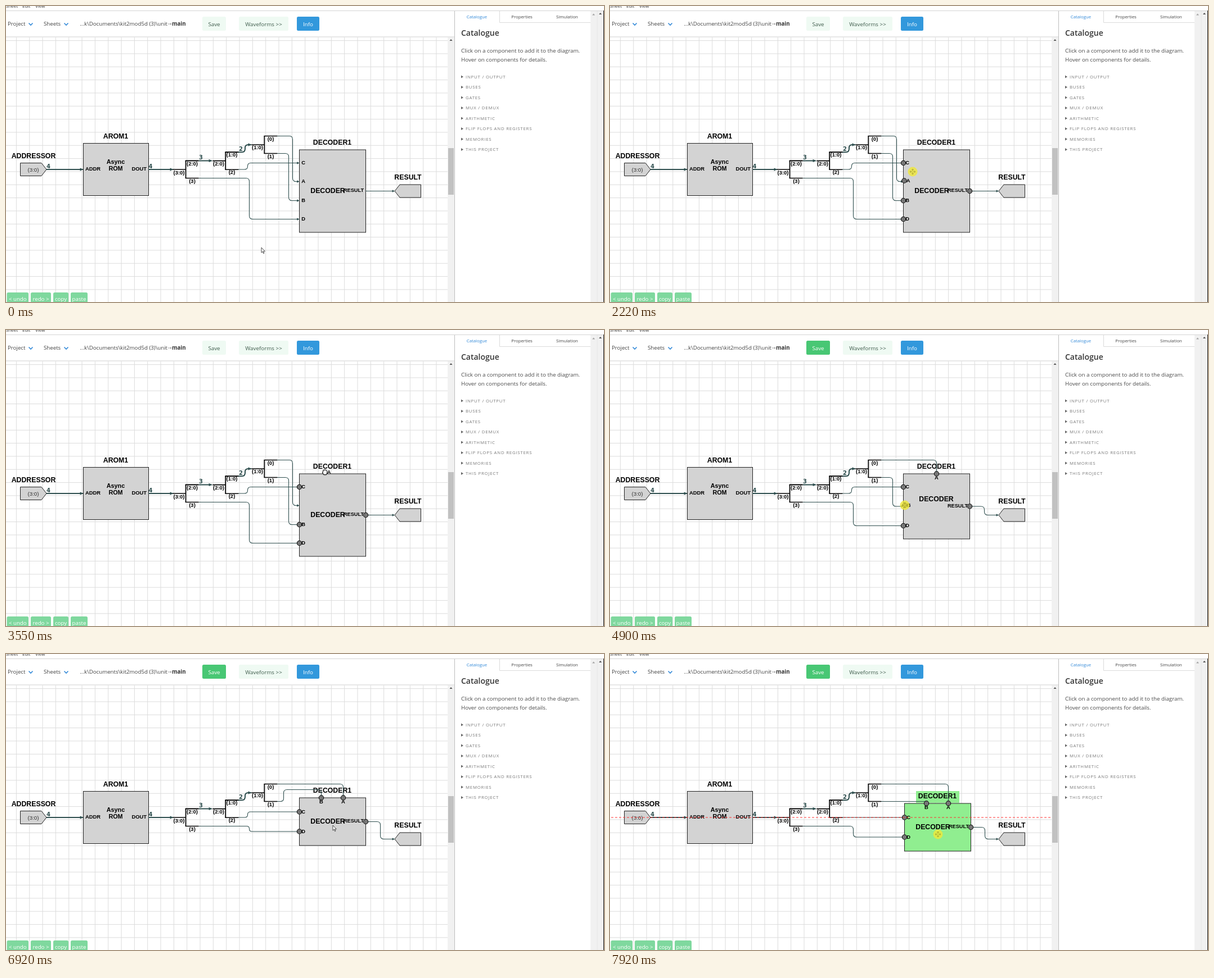
Animation of 1063 by 527 pixels, one loop 7.99 s. Source, as an HTML page:

```html
<!DOCTYPE html>
<html lang="en">
<head>
<meta charset="utf-8">
<title>Circuit editor</title>
<style>
html, body { margin: 0; width: 100%; height: 100%; overflow: hidden; background: #fff; }
svg { display: block; width: 100%; height: 100%; }
text { white-space: pre; }
.ui { font-family: "Open Sans", "Noto Sans", sans-serif; }
.sym { font-family: "Liberation Sans", Arial, sans-serif; }
.num { font-family: "DejaVu Sans", sans-serif; }
</style>
</head>
<body>
<svg id="stage" viewBox="0 0 1063 527"></svg>
<script>
const LOOP = 7990;
const SLATE = '#2f4f4f';

// ---------- drawing helpers ----------
const rect = (x, y, w, h, fill, extra = '') =>
  `<rect x="${x}" y="${y}" width="${w}" height="${h}" fill="${fill}" ${extra}/>`;
const path = (d, stroke, width = 1, extra = '') =>
  `<path d="${d}" fill="none" stroke="${stroke}" stroke-width="${width}" ${extra}/>`;
const shape = (d, fill, stroke = 'none', width = 1) =>
  `<path d="${d}" fill="${fill}" stroke="${stroke}" stroke-width="${width}" stroke-linejoin="round"/>`;

// y is the middle of the capital letters
function text(cls, x, y, str, size, fill = '#000', anchor = 'start', weight = 400, extra = '') {
  const safe = str.replace(/</g, '&lt;').replace(/>/g, '&gt;');
  return `<text class="${cls}" x="${x}" y="${y + size * 0.36}" font-size="${size}" fill="${fill}" ` +
    `text-anchor="${anchor}" font-weight="${weight}" ${extra}>${safe}</text>`;
}
const ui = (...a) => text('ui', ...a);
const bold = (x, y, str, size = 9.4, anchor = 'middle') =>
  text('sym', x, y - 0.4, str, size, '#000', anchor, 700);

// polyline with rounded corners
function rounded(pts, r = 6) {
  let d = `M${pts[0]}`;
  for (let i = 1; i < pts.length - 1; i++) {
    const [a, b, c] = [pts[i - 1], pts[i], pts[i + 1]];
    const la = Math.hypot(a[0] - b[0], a[1] - b[1]) || 1;
    const lc = Math.hypot(c[0] - b[0], c[1] - b[1]) || 1;
    const k = Math.min(r, la / 2, lc / 2);
    const toward = (p, l) => [b[0] + (p[0] - b[0]) * k / l, b[1] + (p[1] - b[1]) * k / l];
    d += `L${toward(a, la)}Q${b} ${toward(c, lc)}`;
  }
  return d + `L${pts[pts.length - 1]}`;
}
function arrow([x, y], down, s = 2.2) {
  return shape(down ? `M${x},${y}l${-s},${-2 * s}h${2 * s}z` : `M${x},${y}l${-2 * s},${-s}v${2 * s}z`, SLATE);
}
function wire(pts, width = 1.1, down = false) {
  return path(rounded(pts), SLATE, width) + arrow(pts[pts.length - 1], down, width > 1.5 ? 2.7 : 2.2);
}
const port = ([x, y]) =>
  `<circle cx="${x}" cy="${y}" r="4.2" fill="#777" stroke="#111" stroke-width="1.1"/>`;

// ---------- fixed parts ----------
function grid() {
  let d = '';
  for (let x = 18.4; x < 785; x += 23.33) d += `M${x.toFixed(2)},56V527`;
  for (let y = 61.6; y < 527; y += 23.33) d += `M0,${y.toFixed(2)}H785`;
  return path(d, '#dcdcdc');
}

function button(x, y, w, h, label, fill, color) {
  return rect(x, y, w, h, fill, 'rx="2.5"') + ui(x + w / 2, 32, label, 9.8, color, 'middle');
}

function toolbar() {
  const chevron = x => path(`M${x - 3.5},30.5l3.5,3.5l3.5,-3.5`, '#3289d8', 1.6);
  return rect(0, 0, 1063, 8, '#fff') +
    ui(0, 0.5, 'Sheet', 8, '#333') + ui(29, 0.5, 'Edit', 8, '#333') + ui(52, 0.5, 'View', 8, '#333') +
    path('M0,8.5H1063', '#d5d5d5') + path('M0,55H797', '#cfcfcf') +
    ui(3, 32, 'Project', 9.7, '#444') + chevron(44) +
    ui(67, 32, 'Sheets', 9.7, '#444') + chevron(107) +
    ui(287, 32, '...k\\Documents\\kit2mod5d (3)\\unit', 9.7, '#444', 'end') +
    path('M288,32h6m-2,-1.5l2,1.5l-2,1.5', '#888', 0.8) +
    ui(295, 32, 'main', 9.7, '#333', 'start', 700) +
    button(414, 19, 88, 25, 'Waveforms >>', '#effaf3', '#3f5c4c') +
    button(517, 19, 40, 25, 'Info', '#3298dc', '#fff');
}

function editButtons() {
  const items = [[1.5, 38.5, '< undo'], [44, 36, 'redo >'], [84, 27, 'copy'], [115, 30, 'paste']];
  return items.map(([x, w, label]) =>
    rect(x, 510, w, 22, '#7fd89e', 'rx="2.5"') +
    ui(x + w / 2, 522, label, 9.7, '#fff', 'middle')).join('');
}

function sidePanel() {
  const groups = ['INPUT / OUTPUT', 'BUSES', 'GATES', 'MUX / DEMUX', 'ARITHMETIC',
    'FLIP FLOPS AND REGISTERS', 'MEMORIES', 'THIS PROJECT'];
  const up = (x, y, c) => shape(`M${x - 2.5},${y + 1.5}h5l-2.5,-3z`, c);
  return rect(785, 56, 12, 471, '#f1f1f1') + rect(786, 253, 10, 83, '#c1c1c1') + up(791, 60.5, '#505050') +
    rect(797, 9, 242, 518, '#fff') + path('M797.5,9V527', '#bdbdbd') +
    rect(1039, 9, 24, 518, '#f1f1f1') + path('M1051,9V527', '#e6e6e6') +
    up(1044.5, 15, '#a3a3a3') + up(1056.5, 13.5, '#505050') + path('M1062.5,8V527', '#111') +
    path('M877.5,9V29.5H1039', '#dbdbdb') +
    ui(837, 19, 'Catalogue', 7.8, '#3289d8', 'middle') +
    ui(917, 19, 'Properties', 7.8, '#444', 'middle') +
    ui(997.5, 19, 'Simulation', 7.8, '#444', 'middle') +
    ui(809, 48.4, 'Catalogue', 14, '#363636', 'start', 600) +
    ui(809, 79.5, 'Click on a component to add it to the diagram.', 9.8, '#4a4a4a') +
    ui(809, 95, 'Hover on components for details.', 9.8, '#4a4a4a') +
    groups.map((g, i) => {
      const y = 126 + 18.5 * i;
      return shape(`M809,${y - 2.5}v5l4,-2.5z`, '#666') +
        ui(817, y, g, 7.8, '#7a7a7a', 'start', 400, 'letter-spacing=".78"');
    }).join('');
}

function splitter(x, y, thickTop) {
  return path(`M${x - 23},${y}H${x}M${x},${y - 15.5}V${y + 15.5}`, '#000', 1.7) +
    path(`M${x - 0.8},${y - 15.5}h24`, '#000', thickTop ? 2 : 1.5) +
    path(`M${x - 0.8},${y + 15.5}h24`, '#000', 1.5);
}

function circuit() {
  const box = '#d3d3d3';
  const labels = [['(3:0)', 307.5, 296.5], ['(2:0)', 331, 280.5], ['(3)', 331, 311.5],
    ['(2:0)', 378, 280.5], ['(1:0)', 401.5, 265], ['(2)', 401.5, 296],
    ['(1:0)', 447, 251.5], ['(0)', 470.5, 237], ['(1)', 470.5, 268]];
  const widths = [['4', 75.5, 285], ['4', 257, 285], ['3', 346.5, 269], ['2', 417.5, 254]];
  return shape('M25.5,279.5H63L72,291L63,302.5H25.5Z', box, '#222') +
    shape('M737.5,318H700L691,329.5L700,341H737.5Z', box, '#222') +
    rect(137.5, 244.5, 116, 93, box, 'stroke="#222"') +
    bold(49, 266.5, 'ADDRESSOR', 12.3) + bold(195, 231.5, 'AROM1', 12.3) + bold(714.5, 304.5, 'RESULT', 12.3) +
    text('sym', 48.5, 291.5, '(3:0)', 9.8, '#333', 'middle') +
    bold(195, 277.5, 'Async', 10.8) + bold(195, 290, 'ROM', 10.8) +
    bold(141, 290, 'ADDR', 9.4, 'start') + bold(250, 290, 'DOUT', 9.4, 'end') +
    splitter(319.5, 291, true) + splitter(390.2, 275.7, true) + splitter(459.3, 247, false) +
    wire([[72, 291], [137, 291]], 2) + wire([[253, 291], [297, 291]], 2) +
    wire([[343, 275.5], [366, 275.5]], 2) +
    wire([[413, 260.2], [425, 260.2], [425, 247], [436, 247]], 2) +
    labels.map(([s, x, y]) => bold(x, y, s, 9.5)).join('') +
    widths.map(([s, x, y]) => text('num', x, y, s, 10, SLATE, 'middle', 700)).join('');
}

// ---------- timing ----------
// bursts of movement: first step, last step, number of steps
const bursts = [[530, 1290, 12], [1360, 2150, 10], [2220, 2900, 11], [3070, 3210, 3], [3460, 3620, 3],
  [3820, 4370, 9], [4900, 5650, 12], [5730, 5730, 1], [5990, 6080, 2],
  [6470, 7230, 12], [7300, 7440, 3], [7640, 7920, 4]];

function hold(t) {
  let q = 0;
  for (const [a, b, n] of bursts) {
    if (t < a) break;
    const step = n > 1 ? (b - a) / (n - 1) : 1;
    q = Math.min(b, a + Math.floor((t - a) / step + 1e-6) * step);
  }
  return q;
}

// pointer positions: time, x, y
const track = [[460, 454, 430], [530, 461, 416], [850, 488, 335], [1000, 499, 308], [1290, 521, 311],
  [2150, 523, 311], [2220, 538, 295], [2480, 557, 268], [2760, 566, 255], [2900, 567, 254],
  [3070, 568, 253], [3210, 567, 253], [3750, 567, 253], [3960, 552, 290], [4140, 533, 327],
  [4240, 526, 324], [4370, 524, 312], [4900, 524, 312], [5170, 538, 282], [5450, 547, 261],
  [5650, 546, 259], [5730, 545, 259], [6400, 545, 259], [6600, 562, 280], [6850, 581, 305],
  [6950, 581, 305], [7150, 583, 315], [7230, 583, 315], [7300, 583, 320], [7440, 583, 321],
  [7920, 583, 321]];

function pointer(t) {
  if (t <= track[0][0]) return track[0].slice(1);
  for (let i = 1; i < track.length; i++) {
    const [t0, x0, y0] = track[i - 1], [t1, x1, y1] = track[i];
    if (t <= t1) {
      const k = (t - t0) / (t1 - t0);
      return [x0 + (x1 - x0) * k, y0 + (y1 - y0) * k];
    }
  }
  return track[track.length - 1].slice(1);
}

// ---------- decoder ----------
const LEFT = 521.5, TOP = 256, RIGHT = 639.5;
const layouts = [
  { h: 147, A: [LEFT, 312.5], B: [LEFT, 346.5], C: [LEFT, 279.5], D: [LEFT, 379.5], R: [RIGHT, 329.5], name: [572, 328.5] },
  { h: 116, A: [580.5, TOP], B: [LEFT, 314], C: [LEFT, 279.5], D: [LEFT, 348.5], R: [RIGHT, 314], name: [580, 301] },
  { h: 85, A: [599.5, TOP], B: [560.5, TOP], C: [LEFT, 281], D: [LEFT, 316], R: [RIGHT, 298.5], name: [572, 297.5] }
];

function decoder(q, drag) {
  const stage = q < 3620 ? 0 : q < 6080 ? 1 : 2;
  const lay = layouts[stage];
  const selected = q >= 6890;
  const snapped = (q >= 7080 && q < 7300) || q >= 7900;
  let dx = 0, dy = 0;
  if (snapped) [dx, dy] = [2, 10];
  else if (selected) {
    const [x, y] = pointer(q);
    [dx, dy] = [x - 581, y - 305];
  }
  const at = k => [lay[k][0] + dx, lay[k][1] + dy];
  const [A, B, C, D, R] = ['A', 'B', 'C', 'D', 'R'].map(at);
  const elbow = (x0, y0, x, end) => wire([[x0, y0], [x, y0], [x, end[1]], end]);
  const [nx, ny] = at('name');
  const fill = selected ? '#90ee90' : '#d3d3d3';

  let s = '';
  if (selected) s += rect(542 + dx, 234 + dy, 77, 21, fill);
  s += rect(LEFT + dx, TOP + dy, RIGHT - LEFT, lay.h, fill, 'stroke="#222"');
  s += bold(580 + dx, 242.5 + dy, 'DECODER1', 12.3) + bold(nx, ny, 'DECODER', 12.3);
  s += bold(636 + dx, R[1] - 1, 'RESULT', 9.2, 'end');

  s += stage === 0 ? elbow(482, 231.5, 509.5, A) : wire([[482, 231.5], [A[0], 231.5], A], 1.1, true);
  if (stage < 2) s += elbow(482, 262.5, 502.5, B);
  else if (B[1] > 263) s += wire([[482, 262.5], [B[0], 262.5], B], 1.1, true);
  else s += wire([[482, 262.5], [493.5, 262.5], [493.5, 241.5], [B[0], 241.5], B], 1.1, true);
  s += elbow(413, 291, 429.5, C) + elbow(343, 306.5, 432.5, D);
  s += elbow(R[0], R[1], 665.5 + dx / 2, [691, 329.5]);

  const moving = q >= 2220 && q < 3620 ? 'A' : q >= 4900 && q < 6080 ? 'B' : '';
  for (const [k, p] of Object.entries({ A, B, C, D })) {
    const pos = k === moving ? drag : p;
    const onTop = k !== moving && p[1] === TOP + dy;
    const released = k === moving && (q >= 5990 || (q >= 3460 && q < 3620));
    if (q > 900 && !released) s += port(pos);
    s += onTop ? bold(pos[0], pos[1] + 7.5, k) : bold(pos[0] + 3.7, pos[1] - 0.3, k, 9.4, 'start');
  }
  if (q > 900) s += port(R);
  if (q > 860 && q < 1150) s += [[437, 247], [482, 231.5], [482, 262.5]].map(port).join('');
  if (snapped) s += path('M2,291H785', '#f33', 1, 'stroke-dasharray="4 3"');
  return s;
}

// ---------- pointer ----------
function cursor(q) {
  const [x, y] = pointer(q);
  const pressed = (q >= 1500 && q < 3460) || (q >= 4900 && q < 5990) || q >= 6890;
  const overPort = (q >= 1200 && q < 3900) || (q >= 4300 && q < 6540);
  let s;
  if (pressed) {
    const arms = [0, 90, 180, 270].map(a =>
      `<path d="M0,-1V-4.6M-1.7,-3L0,-4.8L1.7,-3" transform="rotate(${a})"/>`).join('');
    s = `<circle r="8.5" fill="#f0e838" opacity=".8"/>` +
      `<g fill="none" stroke="#a39c2c" stroke-width=".9">${arms}</g>`;
  } else if (overPort) {
    s = shape('M-3.5,0V-2.5Q-2.7,-4 -1.8,-3.4Q-.8,-4.6 .2,-3.7Q1.2,-4.4 2,-3.2Q3.6,-3.4 3.7,-1.6V1.5L2.4,4.6H-2L-4.4,1.4Q-4.8,0 -3.5,0Z',
      '#fff', '#111', 1.1);
  } else {
    s = shape('M0,0V9.2L2.1,7.2L3.6,10.6L5,10L3.5,6.7H6.3Z', '#fff', '#222', 0.8);
  }
  return `<g transform="translate(${x},${y})">${s}</g>`;
}

// ---------- run ----------
const stage = document.getElementById('stage');
stage.innerHTML = rect(0, 0, 1063, 527, '#fff') + grid() + circuit() + '<g id="live"></g>' +
  toolbar() + editButtons() + sidePanel() + '<g id="save"></g><g id="pointer"></g>';
const [live, save, hand] = ['live', 'save', 'pointer'].map(id => document.getElementById(id));
let shown = -1;

function draw(t) {
  const q = hold(t);
  if (q === shown) return;
  shown = q;
  live.innerHTML = decoder(q, pointer(hold(t - 70)));
  save.innerHTML = q < 3620
    ? button(349, 19, 42, 25, 'Save', '#effaf3', '#3f5c4c')
    : button(349, 19, 42, 25, 'Save', '#48c774', '#fff');
  hand.innerHTML = cursor(q);
}

const start = performance.now();
function tick() {
  draw((performance.now() - start) % LOOP);
  requestAnimationFrame(tick);
}
tick();
</script>
</body>
</html>
```
